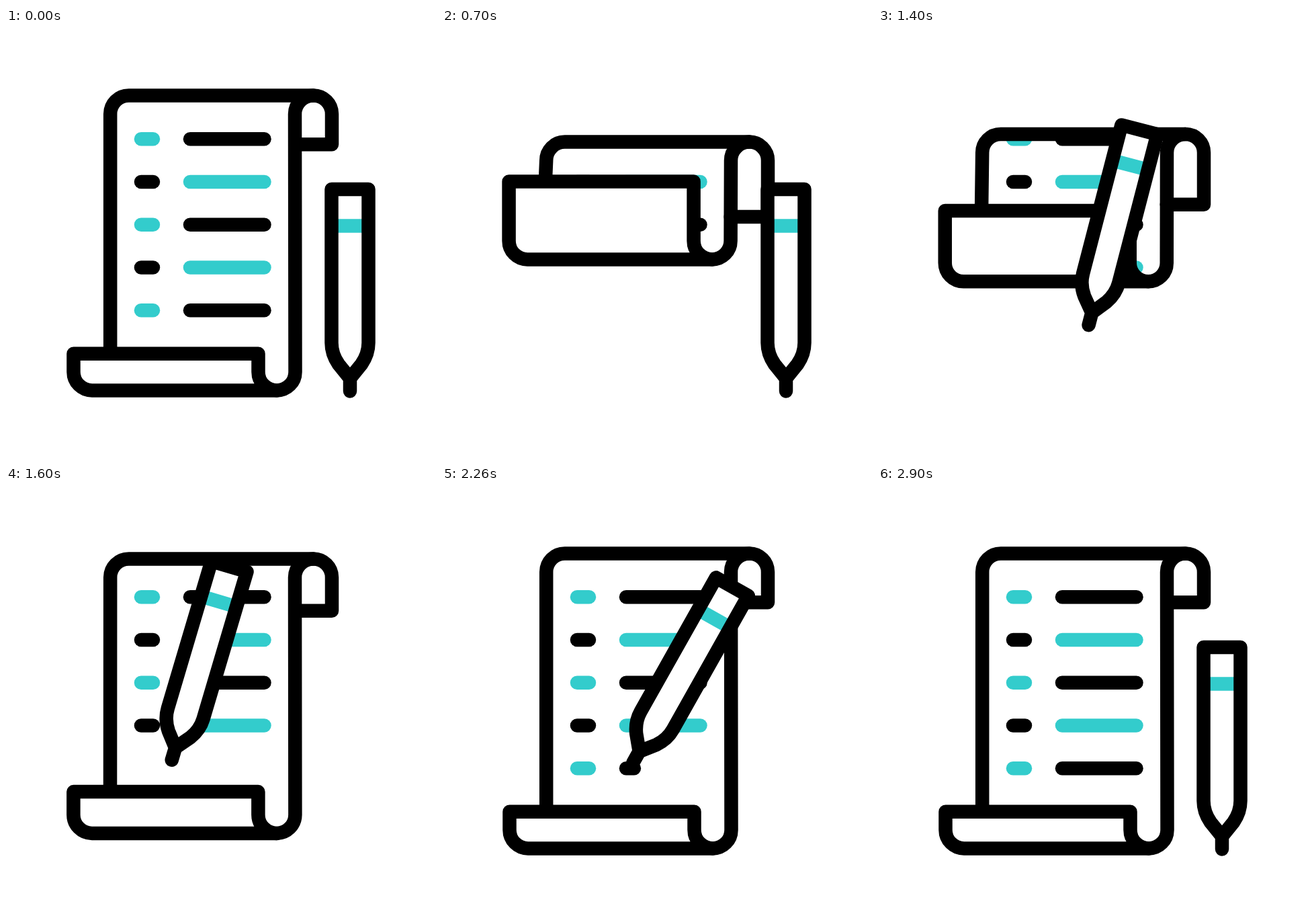
These frames come from a looping animation (640x640 px, 3 s). An HTML page:

```html
<!DOCTYPE html>
<html lang="en">
<head>
<meta charset="utf-8">
<title>Scroll and pen</title>
<style>
  html, body { margin: 0; width: 100%; height: 100%; overflow: hidden; background: #fff; }
  svg { display: block; width: 100vw; height: 100vh; }
  .ink { stroke: #000; }
  .teal { stroke: #3cc; }
  svg * { stroke-width: 20.5px; stroke-linecap: round; stroke-linejoin: round; }
</style>
</head>
<body>
<svg viewBox="0 0 640 640" fill="none">
  <clipPath id="sheet"><rect id="window" x="146" width="294"/></clipPath>
  <g id="rows" clip-path="url(#sheet)"></g>
  <path id="back" class="ink"/>
  <path id="roll" class="ink" fill="#fff"/>
  <path id="front" class="ink"/>
  <!-- The pen is drawn with its tip at 0,0 -->
  <g id="pen">
    <path id="penFill" fill="#fff" d="M-27.5-300.5H27.5V-72C27.5-60 24-50 17-40L0-19L-17-40C-24-50-27.5-60-27.5-72Z"/>
    <path class="teal" stroke-linecap="butt" d="M-24-246H24"/>
    <path class="ink" d="M-27.5-300.5H27.5V-72C27.5-60 24-50 17-40L0-19L-17-40C-24-50-27.5-60-27.5-72ZM0-19V0"/>
  </g>
</svg>
<script>
  const LOOP = 3000;
  const $ = id => document.getElementById(id);
  const clamp = v => Math.min(1, Math.max(0, v));

  // Steep symmetric ease: cubic-bezier(.81, 0, .19, 1)
  function ease(x) {
    let lo = 0, hi = 1;
    for (let i = 0; i < 30; i++) {
      const s = (lo + hi) / 2, r = 1 - s;
      if (3 * .81 * s * r * r + 3 * .19 * s * s * r + s ** 3 < x) lo = s; else hi = s;
    }
    return lo * lo * (3 - 2 * lo);
  }

  const span = (t, from, to) => ease(clamp((t - from) / (to - from)));

  // Time, tip x, tip y, tilt in degrees
  const penKeys = [
    [880, 512, 540.5, 0],
    [1080, 457, 507, 6.4],
    [1180, 406, 477, 12.3],
    [1600, 247, 408, 16.5],
    [1800, 205, 326, 24],
    [2160, 246, 395, 30],
    [2260, 284, 411.5, 29.4],
    [2700, 441, 511, 10],
    [2900, 512, 540.5, 0]
  ];

  // Slope at a key: flat at ends and turning points, else harmonic mean
  function slope(i, c) {
    if (i === 0 || i === penKeys.length - 1) return 0;
    const rate = j => (penKeys[j + 1][c] - penKeys[j][c]) / (penKeys[j + 1][0] - penKeys[j][0]);
    const a = rate(i - 1), b = rate(i);
    return a * b <= 0 ? 0 : 2 * a * b / (a + b);
  }

  function penAt(t, c) {
    const last = penKeys.length - 1;
    if (t <= penKeys[0][0]) return penKeys[0][c];
    if (t >= penKeys[last][0]) return penKeys[last][c];
    const i = penKeys.findIndex(k => k[0] > t) - 1;
    const a = penKeys[i], b = penKeys[i + 1];
    const h = b[0] - a[0], u = (t - a[0]) / h, v = 1 - u;
    return a[c] * v * v * (1 + 2 * u) + b[c] * u * u * (3 - 2 * u)
      + h * u * v * (slope(i, c) * v - slope(i + 1, c) * u);
  }

  function addDash(x1, x2, y, tone) {
    const el = document.createElementNS('http://www.w3.org/2000/svg', 'path');
    el.setAttribute('class', tone);
    $('rows').append(el);
    const draw = end => el.setAttribute('d', end > x1 ? `M${x1} ${y}H${Math.min(end, x2)}` : '');
    draw(x2);
    return draw;
  }

  const SHORT = [201, 219], LONG = [274, 384.5];
  let lastRow;
  for (let i = 0; i < 5; i++) {
    const y = 165.2 + i * 63.75, tones = i % 2 ? ['ink', 'teal'] : ['teal', 'ink'];
    lastRow = [addDash(...SHORT, y, tones[0]), addDash(...LONG, y, tones[1])];
  }

  function drawScroll(p) {
    const top = 100.5 + 75 * p, flap = 173.2 + 117 * p;
    const fold = 484.7 - 278 * p, base = 539.4 - 211.7 * p;
    const r = 27.5, arc = `A${r} ${r} 0 0 `;
    const left = 100.5 - p, lip = 375.5 - p, edge = 430.5 - p;

    $('window').setAttribute('y', top);
    $('window').setAttribute('height', base - top);
    $('back').setAttribute('d',
      `M${155.2 - 1.5 * p} ${fold}L155.2 ${top + r}${arc}1 182.7 ${top}H457.5` +
      `${arc}1 485 ${top + r}V${flap}H${edge}`);
    $('roll').setAttribute('d',
      `M${lip + r} ${base}${arc}1 ${lip} ${base - r}V${fold}H${left}V${base - r}` +
      `${arc}0 ${left + r} ${base}Z`);
    $('front').setAttribute('d',
      `M457.5 ${top}${arc}0 430 ${top + r}L${edge} ${base - r}${arc}1 ${edge - r} ${base}`);
  }

  function drawLastRow(t) {
    const shortLen = SHORT[1] - SHORT[0], longLen = LONG[1] - LONG[0];
    const ink = t < 1010 ? Infinity : (t - 2100) / 692 * (shortLen + longLen);
    lastRow[0](SHORT[0] + ink);
    lastRow[1](LONG[0] + ink - shortLen);
  }

  function frame() {
    const t = performance.now() % LOOP;
    drawScroll(span(t, 0, 1010) - span(t, 1030, 1895));
    drawLastRow(t);
    $('pen').setAttribute('transform',
      `translate(${penAt(t, 1)} ${penAt(t, 2)}) rotate(${penAt(t, 3)})`);
    requestAnimationFrame(frame);
  }
  frame();
</script>
</body>
</html>
```
